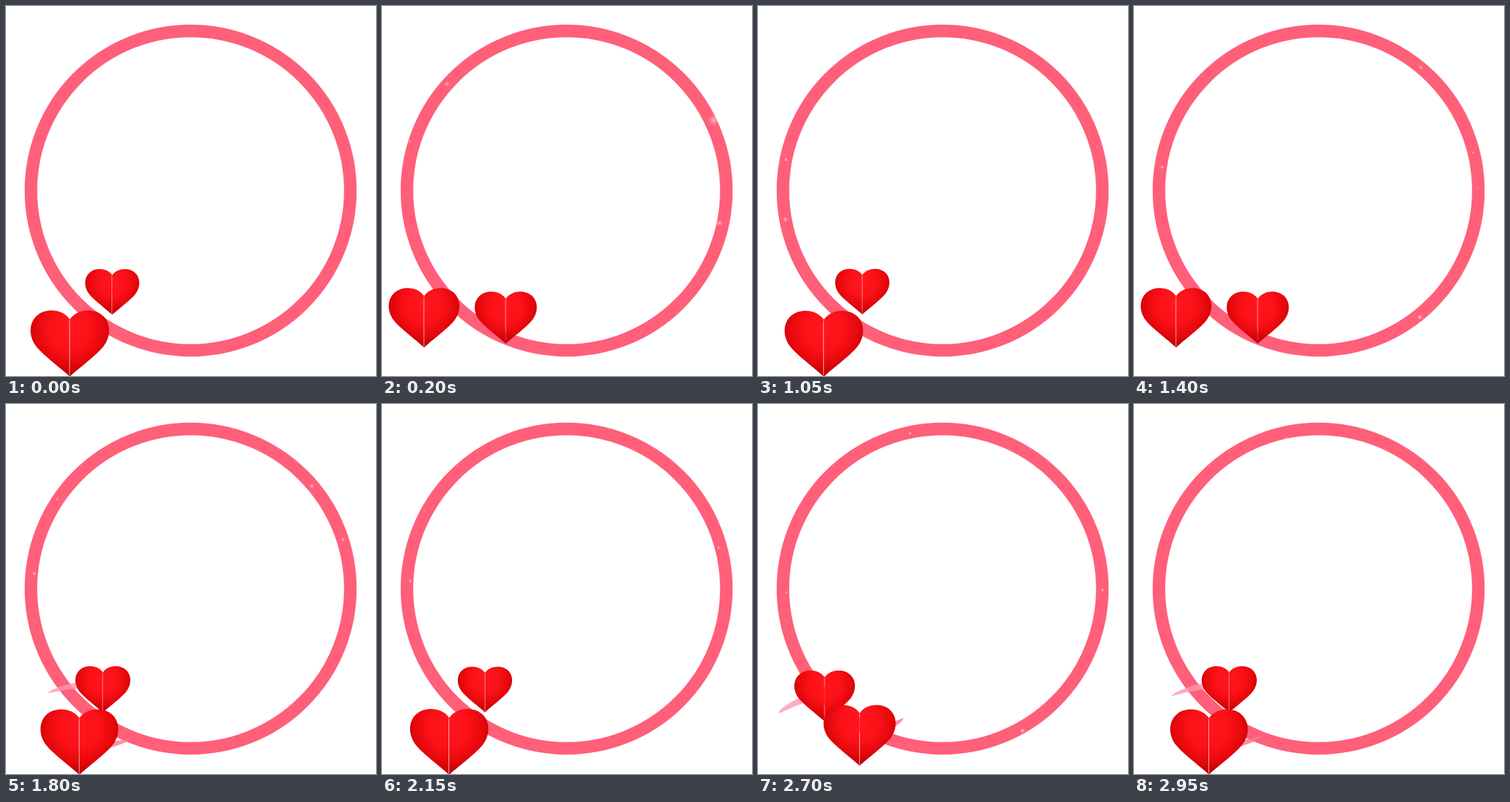
An HTML page with a canvas for the animation above (3 s loop, 512 px wide and 512 px high).

```html
<!DOCTYPE html>
<html lang="en">
<head>
<meta charset="utf-8">
<title>Heart ring</title>
<style>
html, body { margin: 0; width: 100%; height: 100%; overflow: hidden; background: #fff; }
canvas { display: block; }
</style>
</head>
<body>
<canvas id="stage" width="512" height="512"></canvas>
<script>
const ctx = document.getElementById('stage').getContext('2d');
const LOOP = 3000, STEP = 50, SPIN = 24;
const MID = 255.5, RADIUS = 221;
const TAU = Math.PI * 2, RAD = Math.PI / 180;

let seed = 11;
const random = () => (seed = seed * 16807 % 2147483647) / 2147483647;

// A few lasting sparkles at the sides, then short random ones
const sparks = [
  { x: 39, y: 182, birth: 0, life: LOOP, r: 2.4 },
  { x: 459, y: 145, birth: 0, life: 900, r: 7 },
  { x: 467, y: 292, birth: 0, life: 900, r: 4 }
];
for (let i = 0; i < 16; i++) {
  const a = random() * TAU;
  sparks.push({
    x: MID + RADIUS * Math.cos(a),
    y: MID + RADIUS * Math.sin(a) - 6,
    birth: random() * LOOP,
    life: 300 + random() * 400,
    r: 1.5 + random() * 2.5
  });
}

// Orbit angle in degrees: a quick half turn easing into a slow drift
function turnAt(step) {
  const u = step - 2;
  return 108 + u + 152 * (1 - Math.exp(-.263 * u ** 1.23));
}

// Place and size on the tilted orbit; nearer is larger
function orbit(deg, scale = 1) {
  const c = Math.cos(deg * RAD), s = Math.sin(deg * RAD);
  return {
    x: 114.8 + 3 * s * s + (56.5 * c - 18 * s) * scale,
    y: 431.2 + 36.5 * s * scale,
    size: 92 - 6 * c + 16 * s
  };
}

function ring() {
  ctx.beginPath();
  ctx.arc(MID, MID, RADIUS, 0, TAU);
  ctx.lineWidth = 17.4;
  ctx.strokeStyle = '#ff5f79';
  ctx.stroke();
}

function spark(t, { x, y, birth, life, r }) {
  const age = (t - birth + LOOP) % LOOP;
  if (age >= life) return;
  const py = y + age * (.01 + .008 * r);
  const reach = r * 1.25;
  const glow = ctx.createRadialGradient(x, py, 0, x, py, reach);
  glow.addColorStop(0, 'rgba(255,225,232,.9)');
  glow.addColorStop(.45, 'rgba(255,190,205,.5)');
  glow.addColorStop(1, 'rgba(255,150,170,0)');
  ctx.globalAlpha = Math.sqrt(Math.sin(Math.PI * age / life));
  ctx.fillStyle = glow;
  ctx.fillRect(x - reach, py - reach, 2 * reach, 2 * reach);
  ctx.globalAlpha = 1;
}

// Tapered wisp following a heart
function trail(step, angle, flip) {
  const alpha = step < 5 ? 0 : Math.min(1, (16 - step) / 4);
  if (alpha <= 0) return;
  const head = angle - 15;
  const tail = Math.min(head, 208 + 5 * (step - 11));
  const edge = (u, side) => {
    const p = orbit(tail + (head - tail) * u + flip, 1.56 - .36 * u + side * .17 * Math.sqrt(u));
    ctx.lineTo(p.x, p.y);
  };
  ctx.beginPath();
  for (let u = 0; u <= 1; u += .125) edge(u, 1);
  for (let u = 1; u >= 0; u -= .125) edge(u, -1);
  ctx.globalAlpha = alpha;
  ctx.fillStyle = flip ? 'rgba(255,115,145,.8)' : 'rgba(255,150,178,.8)';
  ctx.fill();
  ctx.globalAlpha = 1;
}

function heart({ x, y, size }) {
  ctx.save();
  ctx.translate(x, y);
  ctx.scale(size, size);
  const red = ctx.createRadialGradient(0, -.18, 0, 0, -.18, .6);
  red.addColorStop(0, '#ff181e');
  red.addColorStop(.45, '#fb1117');
  red.addColorStop(.75, '#e2070b');
  red.addColorStop(1, '#b40004');
  ctx.fillStyle = red;
  ctx.beginPath();
  for (const side of [1, -1]) {
    ctx.moveTo(0, -.305);
    ctx.bezierCurveTo(side * .09, -.44, side * .3, -.45, side * .41, -.36);
    ctx.bezierCurveTo(side * .52, -.27, side * .53, -.1, side * .43, .035);
    ctx.bezierCurveTo(side * .34, .15, side * .12, .31, 0, .42);
  }
  // Closes the hairline between the halves
  ctx.rect(-.006, -.295, .012, .7);
  ctx.fill();
  ctx.restore();
}

function draw(t) {
  ctx.clearRect(0, 0, 512, 512);
  ring();
  ctx.globalCompositeOperation = 'source-atop';
  sparks.forEach(s => spark(t, s));
  ctx.globalCompositeOperation = 'source-over';

  let step = t / STEP % SPIN;
  if (step < 2) step += SPIN;
  const angle = turnAt(step);
  trail(step, angle, 0);
  trail(step, angle, 180);
  [orbit(angle), orbit(angle + 180)].sort((a, b) => a.size - b.size).forEach(heart);
}

const start = performance.now();
function tick() {
  const t = Math.max(0, performance.now() - start) % LOOP;
  draw(Math.floor(t / STEP) * STEP);
  requestAnimationFrame(tick);
}
tick();
</script>
</body>
</html>
```
